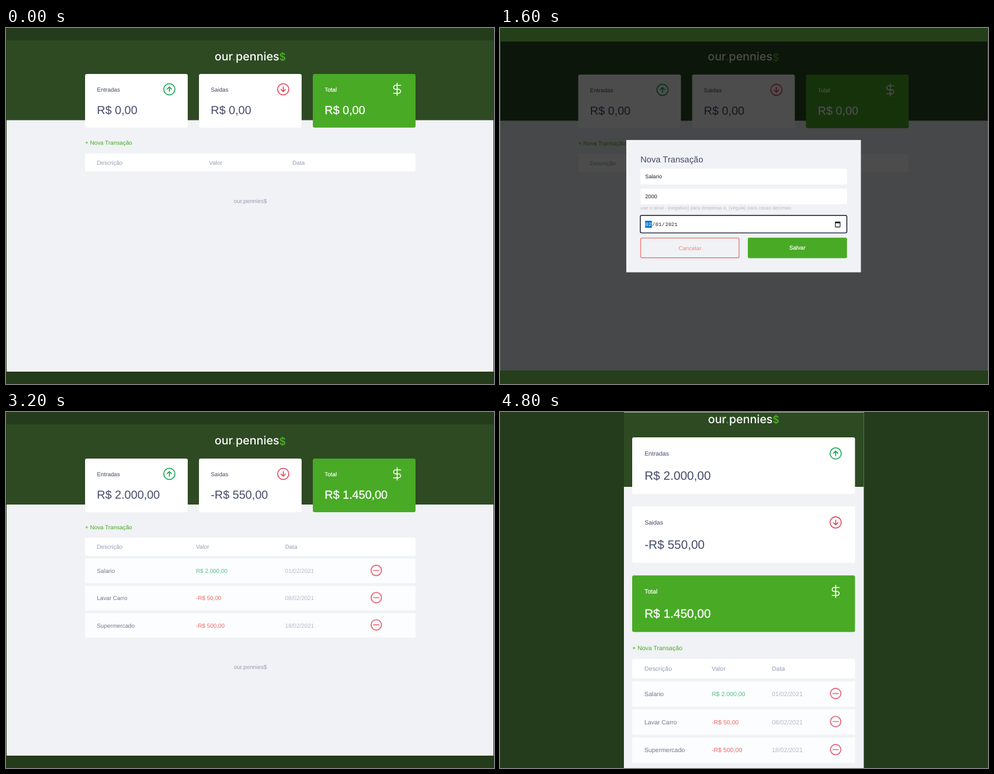
An HTML page for the animation above (6400 ms loop, 827 by 604 pixels).

```html
<!DOCTYPE html>
<html lang="pt-BR">
<head>
<meta charset="utf-8">
<title>Controle de transações</title>
<style>
  html, body { margin: 0; width: 100%; height: 100%; overflow: hidden; background: #243c1b; }
  svg { display: block; width: 100%; height: 100%; }
  text { font-family: "Liberation Sans", Arial, sans-serif; text-rendering: geometricPrecision; white-space: pre; }
  .logo { font-family: Inter, Lato, sans-serif; font-weight: 500; }
  .mono { font-family: "Liberation Mono", monospace; }
  .scene { visibility: hidden; animation: show 6.4s step-end infinite; }
  @keyframes show {
    0% { visibility: visible; }
    25%, 100% { visibility: hidden; }
  }
</style>
</head>
<body>
<svg id="stage" viewBox="0 0 827 604" preserveAspectRatio="none"></svg>
<script>
const C = {
  outer: '#243c1b', head: '#2d4a22', page: '#f0f2f5', green: '#49aa26', ink: '#434b68',
  muted: '#969cb3', income: '#12a454', expense: '#e5445a'
};
const BRAND = ['our', '.', 'pennies', '$'];

const rect = (x, y, w, h, fill, r = 0, extra = '') =>
  `<rect x="${x}" y="${y}" width="${w}" height="${h}" rx="${r}" fill="${fill}" ${extra}/>`;
const text = (x, y, size, fill, str, extra = '') =>
  `<text x="${x}" y="${y}" font-size="${size}" fill="${fill}" ${extra}>${str}</text>`;
const mid = 'text-anchor="middle"';
const shift = (x, y, body) => `<g transform="translate(${x} ${y})">${body}</g>`;
const line = (d, color, width) =>
  `<path d="${d}" fill="none" stroke="${color}" stroke-width="${width}" stroke-linecap="round" stroke-linejoin="round"/>`;
const ring = (r, color, width) =>
  `<circle r="${r}" fill="none" stroke="${color}" stroke-width="${width}"/>`;

const icons = {
  up: ring(9.5, C.income, 1.6) + line('M0 4V-4M-3.7 -.4L0 -4L3.7 -.4', C.income, 1.6),
  down: ring(9.5, C.expense, 1.6) + line('M0 -4V4M-3.7 .4L0 4L3.7 .4', C.expense, 1.6),
  dollar: line('M0 -10.5V10.5M6 -6.7H-2.6a3.3 3.3 0 0 0 0 6.7H2.6a3.3 3.3 0 0 1 0 6.7H-6', '#fff', 1.6),
  minus: ring(8.8, '#ea6c7e', 1.9) + line('M-4.6 0H4.6', '#ea6c7e', 1.6)
};

function logo(x, y) {
  const [a, dot, b, sign] = BRAND;
  return text(x, y, 19.5, '#fff',
    `${a}<tspan fill="${C.green}">${dot}</tspan>${b}<tspan fill="${C.green}" font-size="17.5" font-weight="600" dy=".8">${sign}</tspan>`,
    `class="logo" ${mid}`);
}

// k scales type and padding; the narrow layout is a little larger
function card(x, y, w, h, k, label, amount, icon) {
  const total = icon === 'dollar';
  const ink = total ? '#fff' : C.ink;
  const bold = total ? 'stroke="#fff" stroke-width=".3"' : '';
  return rect(x, y, w, h, total ? C.green : '#fff', 3) +
    text(x + 20 * k, y + 29.8 * k, 9.8 * k, ink, label, bold.replace('.3', '.2')) +
    text(x + 20 * k, y + 68.4 * k, 19.6 * k, ink, amount, bold) +
    shift(x + w - 31.2 * k, y + 26 * k, icons[icon]);
}

function cards(amounts, place) {
  const labels = ['Entradas', 'Saidas', 'Total'];
  const kinds = ['up', 'down', 'dollar'];
  return labels.map((label, i) => card(...place(i), label, amounts[i], kinds[i])).join('');
}

const wide = y => i => [134 + 193 * i, y, 174, 91, 1];
const zero = Array(3).fill('R$ 0,00');
const sums = ['R$ 2.000,00', '-R$ 550,00', 'R$ 1.450,00'];
const items = [
  ['Salario', 'R$ 2.000,00', '01/02/2021'],
  ['Lavar Carro', '-R$ 50,00', '08/02/2021'],
  ['Supermercado', '-R$ 500,00', '18/02/2021']
];

const link = (x, y, size) => text(x, y, size, C.green, '+ Nova Transação');
const footer = y => text(414, y, 9.8, C.muted, BRAND.join(''), mid);

function tableHead(x, y, w, h, size, cols) {
  return rect(x, y, w, h, '#fff', 2) +
    ['Descrição', 'Valor', 'Data'].map((s, i) =>
      text(cols[i], y + h / 2 + size * .36, size, C.muted, s)).join('');
}

function rows(x, y, w, h, step, size, cols, iconX) {
  return items.map((item, i) => {
    const top = y + i * step;
    const base = top + h / 2 + size * .36;
    const inks = ['#363f5f', item[1][0] === '-' ? '#e92929' : C.income, C.muted];
    return rect(x, top, w, h, '#fbfdfe', 1) +
      item.map((s, j) => text(cols[j], base, size, inks[j], s, 'opacity=".7"')).join('') +
      shift(iconX, top + h / 2 - .9, icons.minus);
  }).join('');
}

const backdrop = split =>
  rect(1, 21, 825, 562, C.page) + rect(1, 21, 825, split - 21, C.head);

const emptyPage = () =>
  logo(414, 54.6) + cards(zero, wide(78)) + link(134, 198.4, 9.8) +
  tableHead(134, 212.7, 560, 30.8, 9.8, [154, 344.3, 485.5]) + footer(297);

function modal() {
  const date = (x, s, fill = '#222') => text(x, 336, 8.6, fill, s, 'class="mono"');
  return rect(214, 190, 397.6, 224.5, C.page) +
    text(238, 227.6, 14.6, '#434b68', 'Nova Transação') +
    rect(238, 238.4, 350, 27, '#fff', 2) + text(246, 255, 9.2, '#222', 'Salario') +
    rect(238, 272.8, 350, 26.2, '#fff', 2) + text(246, 289, 9.2, '#222', '2000') +
    text(238, 307.8, 8.17, '#b9bbbe', 'use o sinal - (negativo) para despesas e, (virgula) para casas decimais') +
    rect(237.7, 318, 350, 29.6, '#fff', 2, 'stroke="#15152a" stroke-width="1.4"') +
    rect(246, 327, 11.4, 12, '#0a78d7') + date(246.5, '02', '#fff') +
    date(257.8, '/') + date(263.3, '01') + date(274, '/') + date(280, '2021') +
    rect(568.3, 329.4, 8, 8.2, '#fff', .6, 'stroke="#111" stroke-width="1.1"') +
    rect(568, 328.7, 8.6, 2.6, '#111') +
    rect(238.4, 356.4, 166.8, 33.4, 'none', 2, 'stroke="#ec7a76" stroke-width="1.4"') +
    text(322, 376.5, 9.7, '#ee8a86', 'Cancelar', mid) +
    rect(420, 355.8, 168, 34.6, C.green, 2) +
    text(504, 376.3, 9.7, '#fff', 'Salvar', mid + ' stroke="#fff" stroke-width=".2"');
}

const scenes = [
  () => backdrop(156.4) + emptyPage(),

  () => rect(0, 0, 827, 604, '#253f1a') +
    rect(.5, 23, 826, 558, C.page) + rect(.5, 23, 826, 134.3, C.head) +
    shift(-1.4, .9, emptyPage()) +
    rect(.5, 23, 826, 558, '#000', 0, 'opacity=".7"') + modal(),

  () => {
    const cols = [154, 322, 473];
    return backdrop(157) + logo(414, 54.8) + cards(sums, wide(79)) + link(134, 199.2, 9.8) +
      tableHead(134, 213.3, 560, 30.8, 9.8, cols) +
      rows(134, 249, 560, 41.3, 46.2, 9.8, cols, 627.5) + footer(436.4);
  },

  () => {
    const cols = [244.8, 358.8, 460.8];
    return rect(210, 0, 406.5, 604, C.page) + rect(210, 0, 406.5, 127, C.head) +
      rect(210, 0, 406.5, 1, '#a9b3a5') + logo(413, 18.6) +
      cards(sums, i => [224, 43 + 117.1 * i, 377.6, 96, 1.05]) +
      link(224, 403.8, 10.45) +
      tableHead(224, 419, 377.6, 33, 10.45, cols) +
      rows(224, 457, 377.6, 43, 47.6, 10.45, cols, 568.8);
  }
];

const LOOP = 6.4, HOLD = 1.6;
document.getElementById('stage').innerHTML = scenes.map((draw, i) =>
  `<g class="scene" style="animation-delay:${(i * HOLD - LOOP).toFixed(1)}s">` +
  rect(0, 0, 827, 604, C.outer) + draw() + '</g>').join('');
</script>
</body>
</html>
```
